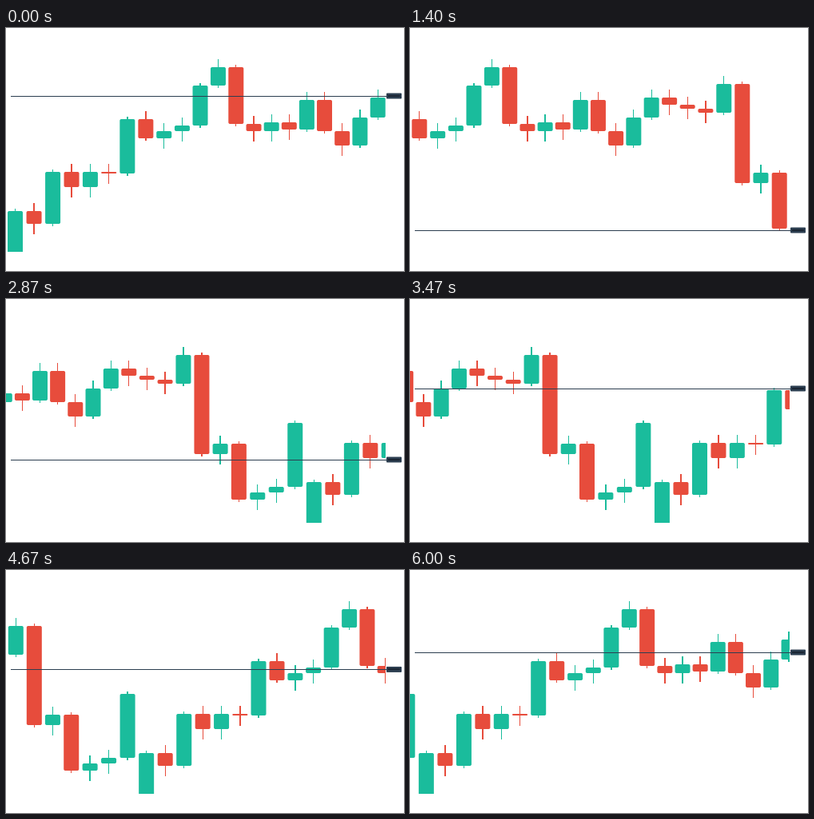
Write a matplotlib script that moves like this. It is 498 px wide and 304 px high and loops after 6.07 s.

```python
import math

import matplotlib.pyplot as plt
from matplotlib.animation import FuncAnimation
from matplotlib.collections import PatchCollection
from matplotlib.patches import FancyBboxPatch, Rectangle
from matplotlib.transforms import Affine2D

W, H, DPI = 498, 304, 100
LOOP_MS, TICK_MS, FPS = 6070, 10, 15   # motion is held at 15 steps a second
SPEED, PERIOD = 7.765, 707.7           # px per step, width of the series
RIGHT, BOTTOM = 475, 280               # plot area limits
BODY, WICK = 19, 1.3
GREEN, RED, NAVY, DARK = "#1abc9c", "#e74c3c", "#2c3e50", "#1a2533"

# closing heights in px from the top; each candle opens at the last close
FIRST_OPEN = 290
CLOSES = [229, 245, 180, 199, 180, 182, 114, 138, 129, 122, 72, 49, 120, 129,
          118, 127, 90, 129, 147, 112, 87, 96, 101, 106, 70, 194, 181, 251,
          242, 235, 155]
OPENS = [FIRST_OPEN] + CLOSES[:-1]
N = len(CLOSES)

# the price line settles slightly past each close
LEVELS = [c + math.copysign(2, c - o) for o, c in zip(OPENS, CLOSES)]
LEVELS[0] = BOTTOM + 1                 # it touches the floor before the rise

fig = plt.figure(figsize=(W / DPI, H / DPI), dpi=DPI, facecolor="white")
ax = fig.add_axes([0, 0, 1, 1])
ax.set_xlim(0, W)
ax.set_ylim(H, 0)
ax.axis("off")


def rounded(x, y, w, h, radius, color, **kw):
    style = f"round,pad=0,rounding_size={min(radius, h / 2)}"
    return FancyBboxPatch((x, y), w, h, boxstyle=style, fc=color, lw=0, **kw)


def rect(x, y, w, h, color, **kw):
    return Rectangle((x, y), w, h, fc=color, lw=0, **kw)


def center(k):
    """Candle centre on the strip; the spacing widens and narrows a little."""
    return 11.5 + PERIOD * k / N + 3.6 * math.sin(math.tau * k / N)


def candle(k):
    o, c = OPENS[k % N], CLOSES[k % N]
    color = RED if c > o else GREEN
    top, size = min(o, c), abs(c - o)
    # short bodies carry the longer wicks
    up = 10 if size < 40 else 3
    down = 13 if size < 20 else 3
    x = center(k)
    return [rect(x - WICK / 2, top - up, WICK, size + up + down, color),
            rounded(x - BODY / 2, top, BODY, size, 2, color)]


def smooth(t):
    t = min(max(t, 0), 1)
    return t * t * (3 - 2 * t)


# the series twice in a row, so that it can scroll past its end
scroll = Affine2D()
strip = PatchCollection([p for k in range(2 * N) for p in candle(k)],
                        match_original=True, zorder=1)
strip.set_transform(scroll + ax.transData)
ax.add_collection(strip, autolim=False)
strip.set_clip_path(Rectangle((0, 0), RIGHT, BOTTOM, transform=ax.transData))

line = ax.add_patch(rect(6, 0, 471, 1, NAVY, zorder=2))
tag = ax.add_patch(rounded(476, 0, 19, 7, 1, NAVY, zorder=3))
tag_text = ax.add_patch(rect(478, 0, 15, 2, DARK, zorder=4))


def price(shift):
    """Ease from the previous level to that of the newest candle."""
    edge = RIGHT + shift + BODY / 2
    k = max(k for k in range(2 * N) if center(k) < edge)
    age = (edge - center(k)) / SPEED
    start, end = LEVELS[(k - 1) % N], LEVELS[k % N]
    return start + (end - start) * smooth((age - 0.75) / 1.7)


def draw(i):
    step = int((i * TICK_MS + 4) * FPS / 1000)
    shift = SPEED * step
    scroll.clear().translate(-shift, 0)
    y = price(shift)
    line.set_y(math.floor(y))
    tag.set_y(y - 3.5)
    tag_text.set_y(y - 1)
    return strip, line, tag, tag_text


anim = FuncAnimation(fig, draw, frames=LOOP_MS // TICK_MS, interval=TICK_MS,
                     repeat=True, repeat_delay=0, blit=False)
plt.show()
```
